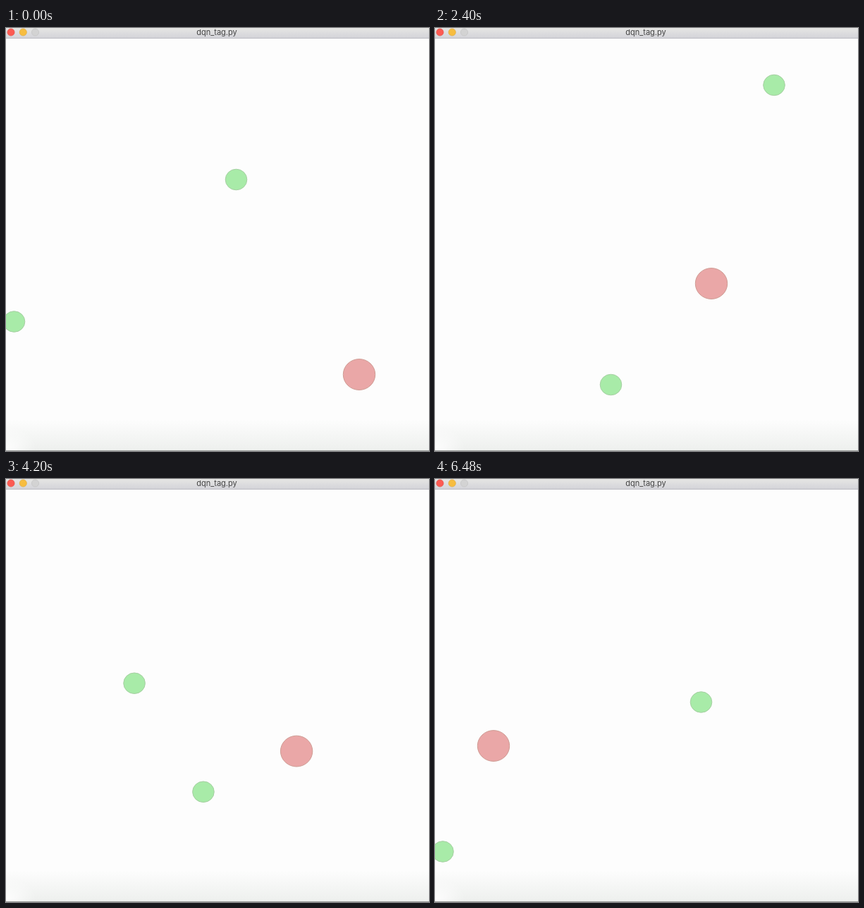
Write an HTML page that moves like this. It is 600x600 px and loops after 6.51 s.

```html
<!DOCTYPE html>
<html lang="en">
<head>
<meta charset="utf-8">
<title>dqn_tag.py</title>
<style>
  html, body { margin: 0; width: 100%; height: 100%; overflow: hidden; background: #fdfdfd; }
  svg { display: block; width: 100vw; height: 100vh; }
  text { font: 11px Inter, "Liberation Sans", sans-serif; fill: #444; text-anchor: middle; }
  .runner { fill: #a8eba8; stroke: #a6cfa2; }
  .chaser { fill: #eaa7a7; stroke: #cf9c94; }
</style>
</head>
<body>
<svg viewBox="0 0 600 600">
  <defs>
    <linearGradient id="bar" x2="0" y2="1">
      <stop stop-color="#e6e6e4"/>
      <stop offset="1" stop-color="#d2d2d8"/>
    </linearGradient>
    <linearGradient id="floor" x2="0" y2="1">
      <stop stop-color="#8c9c8c" stop-opacity="0"/>
      <stop offset="1" stop-color="#8c9c8c" stop-opacity=".14"/>
    </linearGradient>
    <radialGradient id="corner">
      <stop stop-color="#fdfdfd"/>
      <stop offset="1" stop-color="#fdfdfd" stop-opacity="0"/>
    </radialGradient>
  </defs>
  <rect width="600" height="600" fill="#fdfdfd"/>
  <g id="balls"></g>
  <rect y="555" width="600" height="45" fill="url(#floor)"/>
  <ellipse cy="595" rx="42" ry="30" fill="url(#corner)"/>
  <rect y="599" width="600" height="1" fill="#999b99"/>
  <rect width="600" height="15" fill="url(#bar)"/>
  <rect y="14" width="600" height="1" fill="#bcbcc2"/>
  <g stroke-width=".6">
    <circle cx="7" cy="6" r="5.1" fill="#fc5b53" stroke="#df4c44"/>
    <circle cx="24.3" cy="6" r="5.1" fill="#f7bd40" stroke="#dca536"/>
    <circle cx="41.5" cy="6" r="5.1" fill="#d3d3d3" stroke="#bfbfbf"/>
  </g>
  <text x="299" y="10">dqn_tag.py</text>
</svg>
<script>
const LOOP = 6510, STEP = 30;

// Waypoints where a ball changes course: time in ms, x, y
const actors = [
  { kind: "runner", radius: 15.3, path: [
    [0, 326.5, 215], [570, 470.5, 147], [1560, 447.5, 219.5], [2400, 481, 81],
    [3510, 52.5, 324], [3960, 152, 300], [4890, 233.5, 270], [6480, 11, 528.5]] },
  { kind: "runner", radius: 15.3, path: [
    [0, 11.5, 416.5], [570, 224, 273.5], [1560, 340, 375.5], [2400, 249.5, 506],
    [3510, 196.5, 394.5], [4890, 367.5, 493], [6480, 377.5, 316.5]] },
  { kind: "chaser", radius: 22.7, path: [
    [0, 501, 491.5], [570, 161.5, 575.5], [1320, 47, 399], [1560, 78.5, 325],
    [2400, 392, 362.5], [2640, 466, 330], [3510, 118.5, 225], [4620, 551, 521],
    [4890, 539.5, 582.5], [5280, 394, 433], [6480, 83, 378.5]] }
];

// Smooth slope at a waypoint; flat at turning points so nothing overshoots
function slope(path, i, axis) {
  const rate = k => (path[k + 1][axis] - path[k][axis]) / (path[k + 1][0] - path[k][0]);
  if (i === 0) return rate(0);
  if (i === path.length - 1) return rate(i - 1);
  const a = rate(i - 1), b = rate(i);
  return a * b > 0 ? 2 * a * b / (a + b) : 0;
}

function position(path, t, axis) {
  let i = 0;
  while (i < path.length - 2 && t >= path[i + 1][0]) i++;
  const p = path[i], q = path[i + 1], span = q[0] - p[0];
  const u = (t - p[0]) / span, v = 1 - u;
  return v * v * (1 + 2 * u) * p[axis] + u * u * (3 - 2 * u) * q[axis]
    + span * u * v * (v * slope(path, i, axis) - u * slope(path, i + 1, axis));
}

const balls = document.getElementById("balls");
for (const actor of actors) {
  const el = document.createElementNS("http://www.w3.org/2000/svg", "ellipse");
  el.setAttribute("class", actor.kind);
  el.setAttribute("rx", actor.radius);
  el.setAttribute("ry", actor.radius * 0.965);
  balls.append(el);
  actor.el = el;
}

function draw(time) {
  const t = Math.floor((time % LOOP) / STEP) * STEP;
  for (const { el, path } of actors) {
    el.setAttribute("cx", position(path, t, 1).toFixed(2));
    el.setAttribute("cy", position(path, t, 2).toFixed(2));
  }
}

const start = performance.now();
function tick() {
  draw(performance.now() - start);
  requestAnimationFrame(tick);
}
draw(0);
requestAnimationFrame(tick);
</script>
</body>
</html>
```
